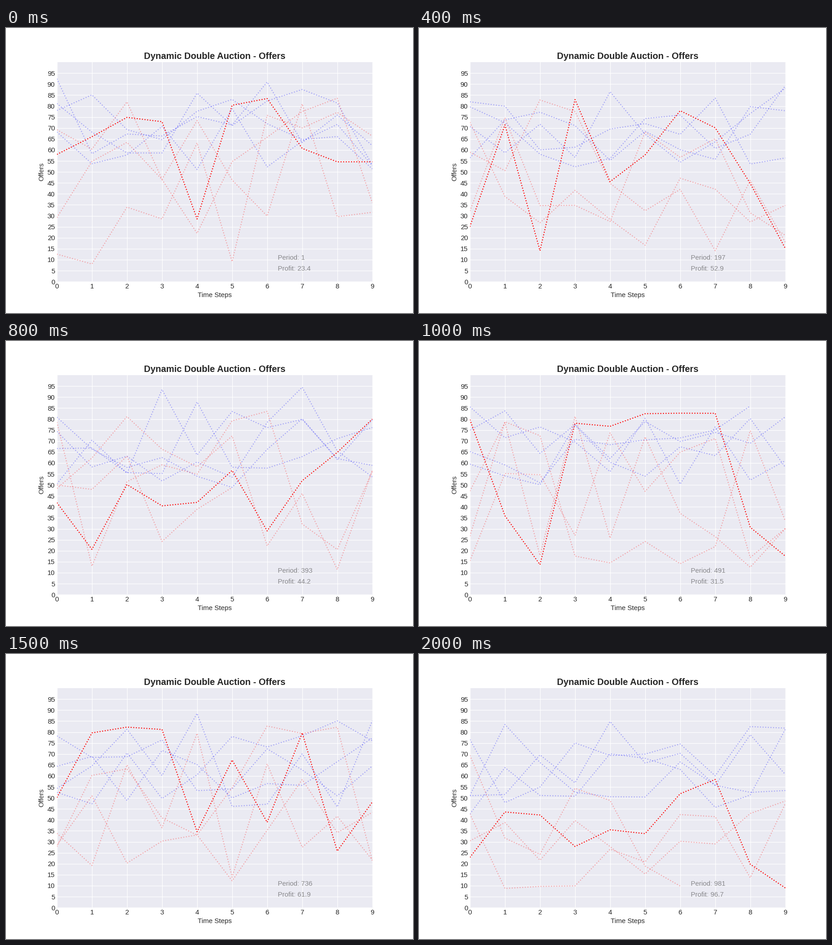
A matplotlib script for the animation above (2.1 s loop, 894x626 px).

```python
import numpy as np
import matplotlib.pyplot as plt
from matplotlib.animation import FuncAnimation

W, H, DPI = 894, 626, 72
PT = 89.4 / DPI  # chart scale: a 10-inch wide layout
FRAMES, INTERVAL = 21, 100
PERIOD_STEP = 49
STEPS, BUYERS, SELLERS = 10, 4, 4

# Profit of the tracked seller at a few moments of the run
PROFIT_AT = [0, 4, 7, 10, 15, 18, 20]
PROFIT = [23.4, 52.9, 50.6, 31.5, 61.9, 65.9, 96.7]

plt.rcParams.update({
    "font.family": "Liberation Sans", "font.size": 12 * PT,
    "text.color": "0.15", "axes.labelcolor": "0.15",
    "xtick.color": "0.15", "ytick.color": "0.15",
    "axes.titlesize": 16 * PT, "axes.titleweight": "bold",
    "axes.titlepad": 6 * PT, "axes.labelpad": 4 * PT,
    "axes.facecolor": "#EAEAF2", "axes.edgecolor": "none",
    "axes.grid": True, "axes.axisbelow": True,
    "grid.color": "white", "grid.linewidth": PT, "grid.linestyle": "-",
    "xtick.major.size": 0, "ytick.major.size": 0,
    "xtick.major.pad": 3.5 * PT, "ytick.major.pad": 3.5 * PT,
    "lines.linewidth": 1.75 * PT,
})


def market(i):
    """Offers of one period: buyers bid high, sellers ask anywhere."""
    rng = np.random.default_rng(100 + i)
    bids = rng.uniform(48, 86, (BUYERS, STEPS)) + rng.normal(0, 4, (BUYERS, STEPS))
    asks = rng.uniform(8, 84, (SELLERS, STEPS))
    offers = [*bids, *asks]
    if rng.random() < 0.5:  # one trader stops early
        k = rng.integers(len(offers))
        offers[k] = offers[k][:rng.integers(6, STEPS)]
    return offers


fig = plt.figure(figsize=(W / DPI, H / DPI), dpi=DPI, facecolor="white")
ax = fig.add_axes([0.125, 0.11, 0.775, 0.77])
ax.set(xlim=(0, 9), ylim=(0, 100), xticks=range(STEPS), yticks=range(0, 100, 5),
       xlabel="Time Steps", ylabel="Offers",
       title="Dynamic Double Auction - Offers")


def dotted(color, alpha=0.3):
    return ax.plot([], [], ":", color=color, alpha=alpha)[0]


lines = [dotted("blue") for _ in range(BUYERS)]
lines += [dotted("red") for _ in range(SELLERS - 1)]
lines.append(dotted("red", 1))  # the tracked seller
period_text = ax.text(6.3, 10, "", alpha=0.5)
profit_text = ax.text(6.3, 5, "", alpha=0.5)


def update(i):
    for line, offers in zip(lines, market(i)):
        line.set_data(range(len(offers)), offers)
    period_text.set_text(f"Period: {1 + PERIOD_STEP * i}")
    profit_text.set_text(f"Profit: {np.interp(i, PROFIT_AT, PROFIT):.1f}")
    return [*lines, period_text, profit_text]


anim = FuncAnimation(fig, update, frames=FRAMES, interval=INTERVAL,
                     repeat=True, repeat_delay=0, blit=False)
plt.show()
```
